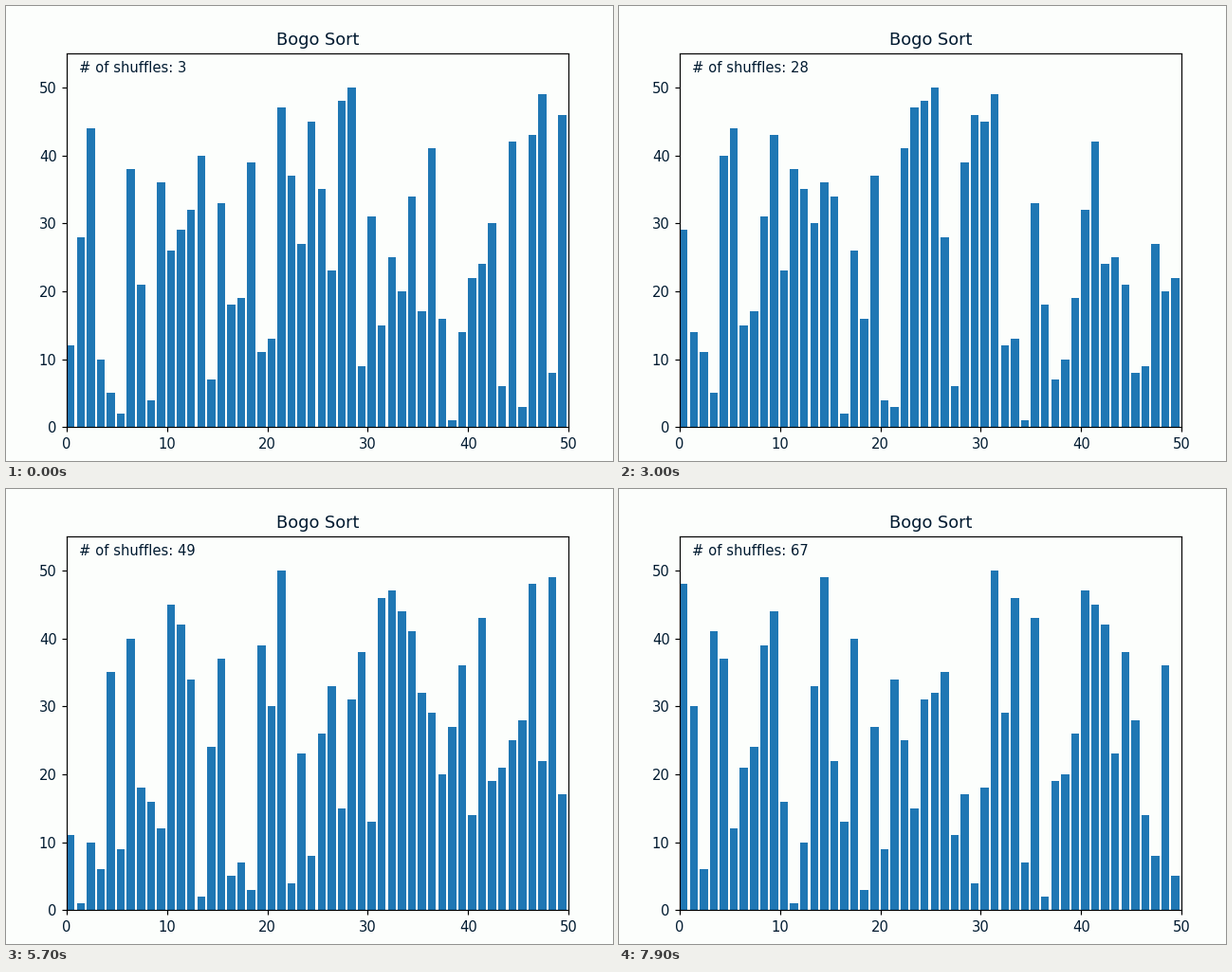
Write a matplotlib script that moves like this. It is 640 px wide and 480 px high and loops after 8000 ms.

```python
import random

import matplotlib.pyplot as plt
from matplotlib.animation import FuncAnimation

WIDTH, HEIGHT, DPI = 640, 480, 100
FRAMES, INTERVAL = 80, 100
SCALE = 16 / 15                 # enlargement of the default plot style
SHUFFLES_PER_FRAME = 0.81
FIRST_COUNT = 3
PAPER, INK, BAR = "#fcfefc", "#001a30", "#1f77b4"

START = [12, 28, 44, 10, 5, 2, 38, 21, 4, 36, 26, 29, 32, 40, 7, 33, 18,
         19, 39, 11, 13, 47, 37, 27, 45, 35, 23, 48, 50, 9, 31, 15, 25, 20,
         34, 17, 41, 16, 1, 14, 22, 24, 30, 6, 42, 3, 43, 49, 8, 46]

plt.rcParams.update({
    "font.family": "DejaVu Sans",
    "font.size": 10 * SCALE,
    "axes.titlesize": 12 * SCALE,
    "axes.titlepad": 6 * SCALE,
    "axes.linewidth": 0.8 * SCALE,
    "text.color": INK,
    "axes.titlecolor": INK,
    "xtick.labelcolor": INK,
    "ytick.labelcolor": INK,
})
for axis in ("xtick", "ytick"):
    plt.rcParams.update({
        f"{axis}.major.size": 3.5 * SCALE,
        f"{axis}.major.pad": 3.5 * SCALE,
        f"{axis}.major.width": 0.8 * SCALE,
    })


def shuffles_done(frame):
    return int(SHUFFLES_PER_FRAME * frame + 0.8)


def make_orders():
    rng = random.Random(7)
    orders = [START]
    for _ in range(shuffles_done(FRAMES - 1)):
        orders.append(rng.sample(START, len(START)))
    return orders


orders = make_orders()

fig = plt.figure(figsize=(WIDTH / DPI, HEIGHT / DPI), dpi=DPI, facecolor=PAPER)
left, right, top, bottom = 64, 593.07, 50, 444.2
ax = fig.add_axes([left / WIDTH, 1 - bottom / HEIGHT,
                   (right - left) / WIDTH, (bottom - top) / HEIGHT],
                  facecolor=PAPER)
ax.set_title("Bogo Sort")
bars = ax.bar(range(len(START)), START, align="edge", color=BAR)
ax.set_xlim(0, len(START))
ax.set_ylim(0, 1.1 * len(START))
counter = ax.text(0.025, 0.95, "", transform=ax.transAxes)


def update(frame):
    done = shuffles_done(frame)
    for bar, height in zip(bars, orders[done]):
        bar.set_height(height)
    counter.set_text(f"# of shuffles: {FIRST_COUNT + done}")
    return [*bars, counter]


animation = FuncAnimation(fig, update, frames=FRAMES, interval=INTERVAL,
                          repeat=True, repeat_delay=0)
plt.show()
```
